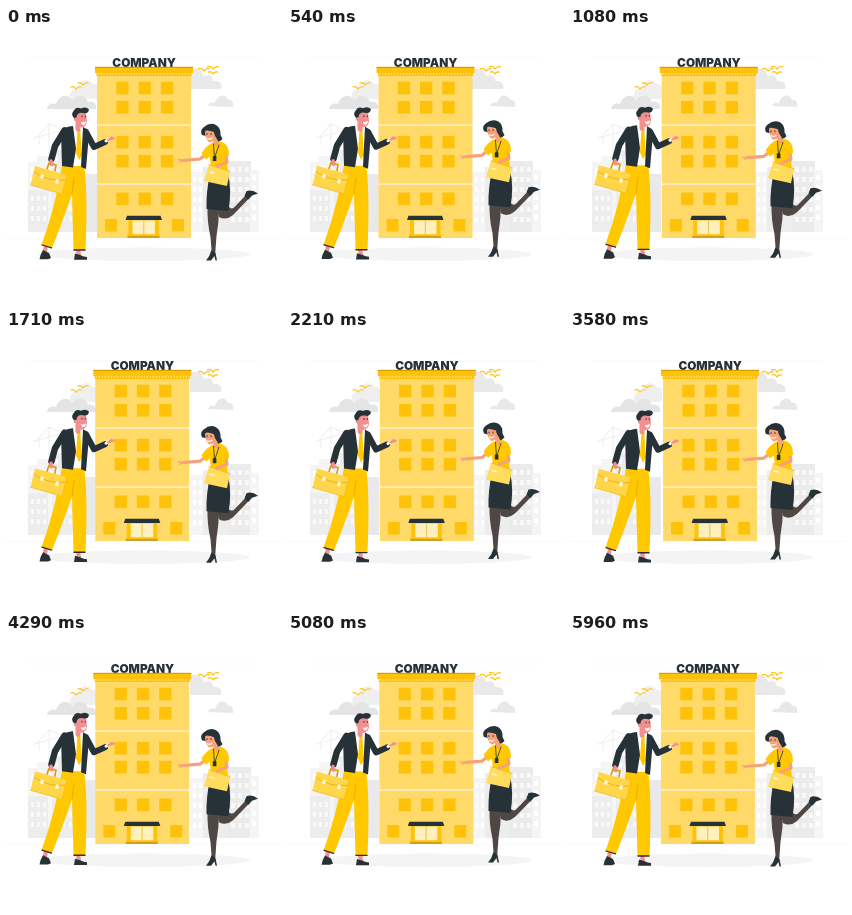
An HTML page with a canvas that plays this animation: 276 px wide and 275 px high, repeating every 6 s.

```html
<!DOCTYPE html>
<html lang="en">
<head>
<meta charset="utf-8">
<title>Company</title>
<style>
html, body { margin: 0; width: 100%; height: 100%; overflow: hidden; background: #fff; }
canvas { display: block; width: 276px; height: 275px; }
</style>
</head>
<body>
<canvas id="stage"></canvas>
<script>
const W = 276, H = 275, LOOP = 6000;
const canvas = document.getElementById('stage');
const ctx = canvas.getContext('2d');
const dpr = window.devicePixelRatio || 1;
canvas.width = W * dpr;
canvas.height = H * dpr;

const DARK = '#263238', GOLD = '#ffc20a', PALE = '#ffda69', SUN = '#ffc800';
const PINK = '#f28f8f', SKIN = '#f5a27a', AMBER = '#d99c00', LEG = '#4e4744';

function rect(x, y, w, h, color) {
  ctx.fillStyle = color;
  ctx.fillRect(x, y, w, h);
}

function shape(d, color) {
  ctx.fillStyle = color;
  ctx.fill(new Path2D(d));
}

function line(d, color, width) {
  ctx.strokeStyle = color;
  ctx.lineWidth = width;
  ctx.lineCap = ctx.lineJoin = 'round';
  ctx.stroke(new Path2D(d));
}

function oval(x, y, rx, ry, color) {
  ctx.fillStyle = color;
  ctx.beginPath();
  ctx.ellipse(x, y, rx, ry, 0, 0, Math.PI * 2);
  ctx.fill();
}

function shifted(x, y, draw) {
  ctx.save();
  ctx.translate(x, y);
  draw();
  ctx.restore();
}

function windows(x, y, cols, rows, dx, dy, w, h, color) {
  for (let r = 0; r < rows; r++)
    for (let c = 0; c < cols; c++) rect(x + c * dx, y + r * dy, w, h, color);
}

function bird(x, y, s) {
  line(`M${x - 5 * s} ${y - s}Q${x - 2 * s} ${y - 2.5 * s} ${x} ${y + s}Q${x + 2 * s} ${y - 2 * s} ${x + 5 * s} ${y - s}`, GOLD, 1.2);
}

function city() {
  const far = '#f5f5f5', near = '#ededed';
  // crane
  line('M43 150V97M28 110L58 102M43 96L31 109M43 96L57 102M33 109V116', '#efefef', 1.1);
  rect(22, 134, 25, 70, far);
  rect(31, 128, 15, 76, far);
  rect(46, 122, 32, 82, near);
  rect(76, 146, 15, 58, '#e9e9e9');
  rect(22, 162, 20, 42, near);
  windows(25, 140, 3, 2, 6, 9, 3, 5, '#fff');
  windows(49, 128, 4, 7, 7, 10, 3, 5, '#f9f9f9');
  windows(25, 168, 3, 3, 6, 10, 3, 5, '#f9f9f9');
  rect(184, 144, 20, 60, far);
  rect(197, 139, 27, 65, near);
  rect(222, 133, 23, 71, '#ebebeb');
  rect(244, 142, 9, 62, far);
  windows(187, 149, 2, 5, 6, 10, 3, 5, '#fff');
  windows(225, 139, 3, 6, 7, 10, 4, 5, '#f8f8f8');
  windows(246, 147, 1, 5, 6, 10, 4, 5, '#fff');
  rect(0, 210, W, .5, '#f3f3f3');
}

function sky() {
  line('M22 30H252', '#f6f6f6', .6);
  shape('M64 71C63 62 69 59 72 60C73 51 83 50 87 56C92 55 94 61 91 71Z', '#efefef');
  shape('M41 81C42 75 48 75 50 76C53 67 62 65 66 72C71 65 80 67 82 74C88 72 91 77 90 81Z', '#e4e4e4');
  shape('M184 61V42C190 39 196 41 198 48C204 46 207 49 207 53C213 52 217 56 215 61Z', '#e9e9e9');
  shape('M202 78C203 74 207 74 209 75C211 66 220 65 222 72C226 71 228 75 227 79Z', '#e8e8e8');
  bird(77, 56, 1); bird(70, 60, 1);
  bird(207, 40, 1.1); bird(198, 42, 1.1); bird(207, 45, .9);
}

function building() {
  ctx.fillStyle = DARK;
  ctx.font = '900 11.8px Inter, "Open Sans", sans-serif';
  ctx.textAlign = 'center';
  ctx.fillText('COMPANY', 138.1, 38.8);
  rect(91, 47, 94, 163, PALE);
  rect(90.5, 44, 95, 4, GOLD);
  windows(91.5, 45, 31, 1, 3, 0, 1.2, 1.8, '#ffe08a');
  rect(89, 39, 98, 6, GOLD);
  rect(89, 38.8, 98, 1.2, AMBER);
  rect(91, 96.5, 94, 1.2, '#fff7df');
  rect(91, 155.5, 94, 1.2, '#fff7df');
  windows(110.3, 53.7, 3, 2, 22.3, 19.2, 12.3, 12.7, GOLD);
  windows(110.3, 107.8, 3, 2, 22.3, 19, 12.3, 12.7, GOLD);
  windows(110.3, 164.5, 3, 1, 22.3, 19, 12.3, 12.7, GOLD);
  windows(99, 191, 2, 1, 67, 0, 12, 12.5, GOLD);
  // entrance
  rect(122.5, 191, 30.5, 17, GOLD);
  rect(126.5, 192.5, 22.5, 14, '#fff0bd');
  rect(137.3, 192.5, 1, 14, '#edc04a');
  shape('M121 187.7H154.5L156 192H119.5Z', DARK);
  rect(121.5, 206.5, 32, 2.5, GOLD);
  rect(121.5, 208.6, 32, .9, '#8a6c1d');
}

function briefcase() {
  line('M41 141L43 135L50 137L49 143', AMBER, 1.6);
  shape('M29 138L61 147L56 166L24.5 157Z', '#ffd64a');
  line('M28 144Q42 154 60 152', '#e9b10c', .9);
  line('M24.5 157L56 166L61 147', '#f2bd1c', .8);
  shape('M35 146L38 147L37 151L34 150ZM50 151L53 152L52 156L49 155Z', '#fff7d8');
}

function man() {
  // shoes and ankles
  line('M40 217L39 224M72 220L73 228', PINK, 4.2);
  shape('M37 222L43 225L45 230L42 231.3H33.5Q34 227 37 222Z', DARK);
  shape('M69 225.5L74 227Q78 229 81 229V231.8H68Z', DARK);
  // trousers
  shape('M56 137H78Q82 162 79.5 222H67.5L66 166Q58 190 46 220L35.5 217Q50 177 56 137Z', SUN);
  line('M36 217L45.5 219.8M68 222H79', DARK, 1.3);
  line('M66 166L68 150', '#dfa900', .8);
  // far arm
  line('M80 104L88 119L99 114', DARK, 6);
  line('M100 113L102.5 111.5', '#fff', 3);
  line('M102 112L106 109.3M103 112L108 110.3', PINK, 1.8);
  // torso
  shape('M66 100L78 99L79 138L62 138Z', '#fff');
  shape('M71.5 102L74.5 102L74.5 106L76 127L73 132L70 125Z', SUN);
  shape('M67 98Q59 98 55 104L56 138L67 139.5L70 121Z', DARK);
  shape('M77 99Q82 101 83 106L80 141L75 139Z', DARK);
  // head
  line('M72 95V101', PINK, 5);
  shape('M69 84Q75 82 80 85L81 93Q80 100 74.5 99.5Q69 97 69 90Z', PINK);
  oval(69.3, 91, 1.6, 2, PINK);
  shape('M68 90Q64.5 86.5 67.5 83Q70 78 75 80.5Q80 78 83 81.5Q82 86.5 77 85Q71 84 70.5 89.5Z', DARK);
  line('M76 88V89M79.3 88V89', DARK, .9);
  shape('M74.5 94Q77.5 95 80 93Q79.5 97.5 76.5 97Z', '#fff');
  // near arm with bag
  line('M45 131L45 136', PINK, 4);
  briefcase();
  line('M58.5 102.5L49 118L45.5 131', DARK, 6.5);
  line('M45 133L46 136.5', PINK, 3.4);
}

function woman() {
  // legs
  shape('M211 179L223 179Q226 182 229 178.5L240 167L243 170.5L227 187Q220 193 213 189Z', LEG);
  shape('M201.5 179H213Q213 194 210.5 208L209 228H206L204.5 209Q201 193 201.5 179Z', LEG);
  shape('M238.5 168L240.5 163Q246 161 252 165.5L246 167.5L242.5 171.5Z', DARK);
  shape('M205.5 222L209.5 225L211 232.5H209.5L208.5 228L205 232.5H200Q204 228 205.5 222Z', DARK);
  // skirt and top
  shape('M204 146L222 146Q226 162 222.5 183L200.5 181Q200 164 204 146Z', DARK);
  shape('M206 115Q211 112 216 114Q222 116 221 124L222 149H204Q206 132 202 124Z', SUN);
  // reaching arm
  line('M204 123L194 131L178 132.3', SKIN, 3.2);
  line('M179 132.3L172.5 131.8M177 132.5L174 134', SKIN, 1.4);
  shape('M206 115Q201 117 195.5 125L200 131.5L209 124Z', SUN);
  // head
  shape('M196 107Q193.5 102 198 99Q204 94 210 97Q215 100 214.5 107L216.5 111Q213 115 209 113L200 108Z', DARK);
  line('M208 109L210.5 116', SKIN, 4.5);
  shape('M199 102Q204 99 208.5 102L209 110Q207 115 203 114.3Q198.5 110 199 102Z', SKIN);
  shape('M196.5 106Q196 100 201 98.5Q209 96 212 103Q212.5 108 211 111Q208.5 108 208 104Q203 102 200 102.5Z', DARK);
  line('M201 105.5V106.5M205 105.5V106.5', DARK, .9);
  line('M201.5 110.5Q204 112 206 110', '#fff', 1.1);
  // lanyard
  line('M207.5 116L208.5 130L213 117', DARK, .8);
  rect(206.8, 128, 3.6, 5, DARK);
  // folder and near arm
  shape('M203 136.5L224 143.5L221 158L198 153Z', '#ffdc5c');
  line('M203 136.5L224 143.5', '#ecb51c', .7);
  line('M204 144L208 145', '#fff7d8', 1.4);
  line('M219.5 125L221 134L211 138', SKIN, 3.2);
  shape('M215 115Q223 115 223 128L216 129Z', SUN);
}

// horizontal offsets at each tenth of the loop
const SHAKE = [0, -.55, 1.1, -2.2, 2.2, -2.2, 2.2, -2.2, 1.1, -.55, 0];

function shake(p) {
  const i = Math.min(9, Math.floor(p * 10));
  return SHAKE[i] + (SHAKE[i + 1] - SHAKE[i]) * (p * 10 - i);
}

function lift(t, period, height) {
  return -height * (1 - Math.cos(2 * Math.PI * t / period)) / 2;
}

function frame(now) {
  const t = now % LOOP;
  ctx.setTransform(dpr, 0, 0, dpr, 0, 0);
  rect(0, 0, W, H, '#fff');
  sky();
  city();
  oval(138, 226.3, 106, 6.7, '#f4f4f4');
  shifted(shake(t / LOOP), 0, building);
  shifted(0, lift(t, 3000, .8), man);
  shifted(0, lift(t, 1500, 4.5), woman);
  requestAnimationFrame(frame);
}

const start = performance.now();
requestAnimationFrame(now => frame(Math.max(0, now - start)));
</script>
</body>
</html>
```
